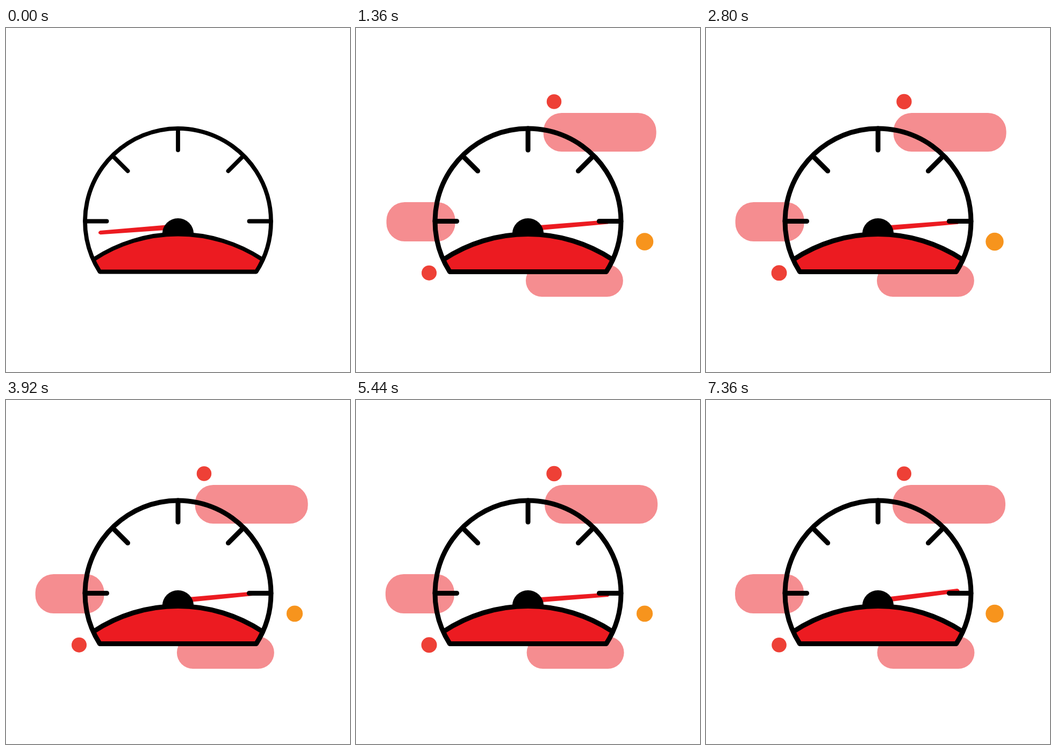
Write an HTML page with a canvas that moves like this. It is 640 px wide and 640 px high and loops after 7.44 s.

```html
<!DOCTYPE html>
<html lang="en">
<head>
<meta charset="utf-8">
<title>Gauge</title>
<style>
html, body { margin: 0; width: 100%; height: 100%; overflow: hidden; background: #fff; }
canvas { display: block; width: 100vw; height: 100vh; object-fit: contain; }
</style>
</head>
<body>
<canvas id="stage" width="640" height="640"></canvas>
<script>
const ctx = document.getElementById('stage').getContext('2d');
const LOOP = 7440, STEP = 80, TAU = Math.PI * 2, DEG = Math.PI / 180;
const RED = '#ec1b21', PINK = '#f58d90', DOT = '#ee4036', ORANGE = '#f7941d';

const clamp = v => Math.max(0, Math.min(1, v));
const ramp = (t, from, to) => clamp((t - from) / (to - from));
const easeInOut = (u, p) => u < 0.5 ? Math.pow(2 * u, p) / 2 : 1 - Math.pow(2 - 2 * u, p) / 2;
const easeOut = u => 1 - Math.pow(1 - u, 3);
const backOut = u => 1 + 2.7 * Math.pow(u - 1, 3) + 1.7 * Math.pow(u - 1, 2);
// 1 at the peak time, 0 half a period later
const pulse = (t, peak, period) => 0.5 + 0.5 * Math.cos(TAU * (t - peak) / period);

// Eased travel: 0 at the rest time, 1 half a period later
function swing(t, rest, period) {
  const u = (((t - rest) / period) % 1 + 1) % 1 * 2;
  return easeInOut(u < 1 ? u : 2 - u, 3);
}

function pill(x, y, w, h, r, scale) {
  if (scale <= 0) return;
  ctx.save();
  ctx.translate(x + w / 2, y + h / 2);
  ctx.scale(scale, scale);
  ctx.fillStyle = PINK;
  ctx.beginPath();
  ctx.roundRect(-w / 2, -h / 2, w, h, r);
  ctx.fill();
  ctx.restore();
}

function dot(x, y, r, color) {
  if (r <= 0) return;
  ctx.fillStyle = color;
  ctx.beginPath();
  ctx.arc(x, y, r, 0, TAU);
  ctx.fill();
}

function line(x1, y1, x2, y2) {
  ctx.beginPath();
  ctx.moveTo(x1, y1);
  ctx.lineTo(x2, y2);
  ctx.stroke();
}

function drawShapes(t) {
  const grow = easeOut(ramp(t, 820, 1160));
  const pop = backOut(ramp(t, 820, 1200));
  const drift = 11.2 * swing(t, 7210, 1540);
  pill(347 + 5 * pulse(t, 3800, 1440), 158, 210, 72, 34, grow);
  pill(53.7 + drift, 324, 128, 73, 34, grow);
  pill(318.8 - drift, 440, 181, 60, 30, grow);

  const r = 13.5 + 1.2 * pulse(t, 7102, 595);
  dot(368.5, 137, r * pop, DOT);
  dot(136, 455.7, (r + 0.25) * pop, DOT);
  dot(537, 397.5, (15 + 1.8 * pulse(t, 7300, 760)) * pop, ORANGE);
}

function drawNeedle(t) {
  const sweep = easeInOut(ramp(t, 0, 880), 2);
  const shake = 3.8 * pulse(t, 7368, 725) - 1.9;
  const angle = -184.4 + sweep * (179.1 - shake);
  ctx.save();
  ctx.translate(322, 371.3);
  ctx.rotate(angle * DEG);
  // The needle's axis lies slightly beside the pivot
  ctx.translate(0, 1.9);
  ctx.fillStyle = RED;
  ctx.beginPath();
  ctx.moveTo(0, -4.8);
  ctx.lineTo(147, -3.7);
  ctx.quadraticCurveTo(154, 0, 147, 3.7);
  ctx.lineTo(0, 4.8);
  ctx.fill();
  ctx.restore();
}

function drawGauge(t) {
  const cx = 320, cy = 360, R = 173, arcY = 668.5, arcR = 285;
  const baseY = 453.5, halfBase = 145.5;
  const a = Math.asin(156 / arcR), b = Math.asin((baseY - cy) / R);
  const top = -Math.PI / 2, c = Math.asin(70.5 / R);

  dot(cx, 383.3, 29.3, '#000');

  ctx.strokeStyle = '#000';
  ctx.lineWidth = 7.8 + 1.2 * ramp(t, 0, STEP);
  ctx.lineCap = ctx.lineJoin = 'round';
  line(147, 359.5, 187.5, 359.5);
  line(452.5, 359.5, 493, 359.5);
  line(cx, 187, cx, 227);
  line(199, 238.5, 226.5, 266);
  line(441, 238.5, 413.5, 266);

  ctx.fillStyle = RED;
  ctx.beginPath();
  ctx.arc(cx, arcY, arcR, top - a, top + a);
  ctx.arc(cx, cy, R, c, b);
  ctx.lineTo(cx - halfBase, baseY);
  ctx.arc(cx, cy, R, Math.PI - b, Math.PI - c);
  ctx.fill();

  ctx.beginPath();
  ctx.arc(cx, arcY, arcR, top - a, top + a);
  ctx.stroke();

  ctx.beginPath();
  ctx.arc(cx, cy, R, Math.PI - b, b);
  ctx.closePath();
  ctx.stroke();
}

function frame(now) {
  const t = Math.floor(now % LOOP / STEP) * STEP;
  ctx.fillStyle = '#fff';
  ctx.fillRect(0, 0, 640, 640);
  drawShapes(t);
  drawNeedle(t);
  drawGauge(t);
  requestAnimationFrame(frame);
}

frame(0);
</script>
</body>
</html>
```
